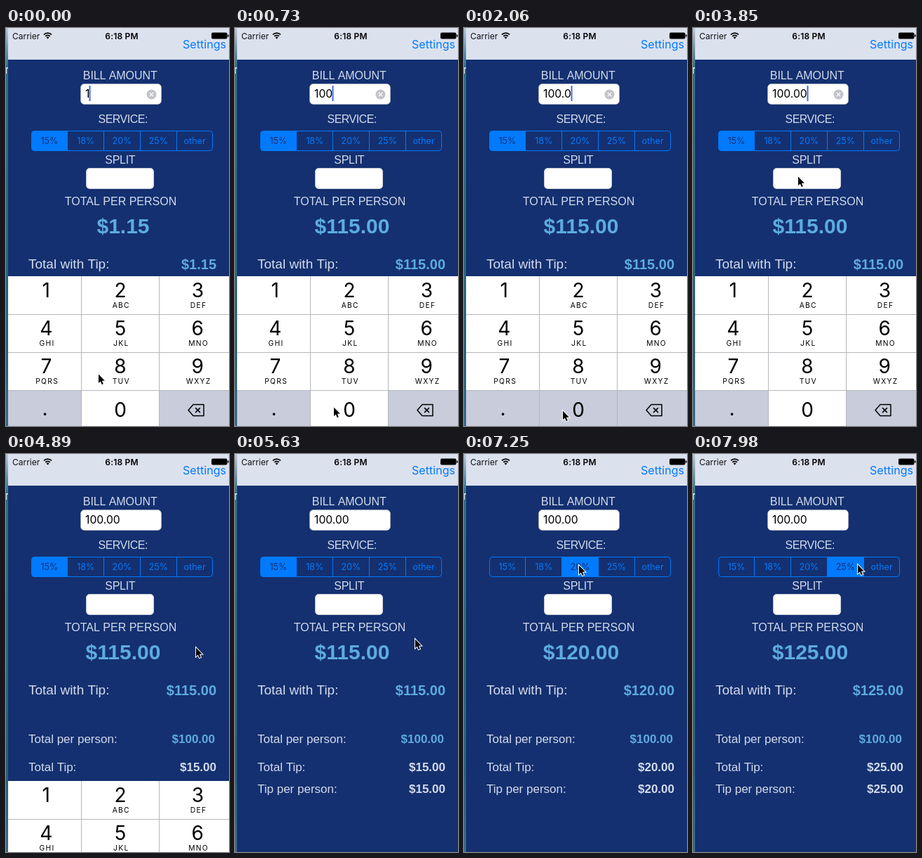
Animation of 318x566 px, one loop 8000 ms. Source, as an HTML page with a canvas:

```html
<!DOCTYPE html>
<html lang="en">
<head>
<meta charset="utf-8">
<title>Tip calculator</title>
<style>
html, body { margin: 0; width: 100%; height: 100%; overflow: hidden; background: #143070; }
canvas { display: block; width: 318px; height: 566px; }
</style>
</head>
<body>
<canvas id="stage"></canvas>
<script>
const W = 318, H = 566, LOOP = 8000, TICK = 148;
const NAVY = '#143070', BLUE = '#007aff', SKY = '#5dabe0', PALE = '#d3dbec', GRAY = '#c8ccdb';
const UI = 'Inter, Roboto, sans-serif';
const LABEL = '"Liberation Sans", Arial, sans-serif';

const canvas = document.getElementById('stage');
const ctx = canvas.getContext('2d');
const ratio = window.devicePixelRatio || 1;
canvas.width = W * ratio;
canvas.height = H * ratio;

// Pointer stops: tick, x, y
const path = [
  [0, 131, 491], [1, 139, 534], [2, 140, 538], [5, 140, 538], [8, 58, 549],
  [10, 58, 549], [12, 138, 544], [13, 140, 543], [18, 140, 543], [23, 148, 211],
  [25, 148, 211], [26, 149, 210], [29, 302, 308], [31, 270, 274], [37, 270, 274],
  [42, 137, 156], [45, 137, 156], [48, 162, 157], [50, 164, 157], [53, 234, 156]
];
const typed = [[0, '1'], [2, '10'], [5, '100'], [9, '100.'], [14, '100.0'], [17, '100.00']];
const service = [[0, 0], [43, 1], [49, 2], [54, 3]];
const slide = [[0, 0], [33, 112], [34, 196], [35, 230]];
const rates = [15, 18, 20, 25];
const zeroDown = [1, 3, 4, 13, 14, 15, 17];
const dotDown = [8, 9];
const letters = ['', 'ABC', 'DEF', 'GHI', 'JKL', 'MNO', 'PQRS', 'TUV', 'WXYZ'];
const colX = [57.3, 163, 273.3];

const at = (list, tick) => list.filter(s => s[0] <= tick).pop()[1];
const money = v => '$' + v.toFixed(2);

function pointer(tick) {
  const i = path.findIndex(p => p[0] > tick);
  if (i < 0) return path[path.length - 1].slice(1);
  const [t0, x0, y0] = path[i - 1], [t1, x1, y1] = path[i];
  const u = (tick - t0) / (t1 - t0), k = u * u * (3 - 2 * u);
  return [Math.round(x0 + (x1 - x0) * k), Math.round(y0 + (y1 - y0) * k)];
}

function rect(x, y, w, h, color) {
  ctx.fillStyle = color;
  ctx.fillRect(x, y, w, h);
}

function text(str, x, y, font, color, align = 'left', spacing = 0) {
  ctx.font = font;
  ctx.letterSpacing = spacing + 'px';
  ctx.fillStyle = color;
  ctx.textAlign = align;
  ctx.fillText(str, x, y);
  ctx.letterSpacing = '0px';
}

function line(points, color, width, close) {
  ctx.beginPath();
  points.forEach(([x, y]) => ctx.lineTo(x, y));
  if (close) ctx.closePath();
  ctx.strokeStyle = color;
  ctx.lineWidth = width;
  ctx.stroke();
}

function cross(x, y, r, color, width) {
  line([[x - r, y - r], [x + r, y + r]], color, width);
  line([[x + r, y - r], [x - r, y + r]], color, width);
}

function box(x, y, w, h, r) {
  ctx.beginPath();
  ctx.roundRect(x, y, w, h, r);
}

function field(x, y, w, h) {
  box(x, y, w, h, 5);
  ctx.fillStyle = '#fff';
  ctx.fill();
  box(x + 0.25, y + 0.25, w - 0.5, h - 0.5, 5);
  ctx.strokeStyle = '#ccc';
  ctx.lineWidth = 0.5;
  ctx.stroke();
}

function edge() {
  const g = ctx.createLinearGradient(0, 0, 0, H);
  g.addColorStop(0, '#b9c9d8');
  g.addColorStop(0.05, '#6f9ab0');
  g.addColorStop(0.1, '#2b6f86');
  g.addColorStop(0.5, '#286a78');
  g.addColorStop(0.8, '#27607a');
  g.addColorStop(1, '#386a8a');
  rect(0, 0, 3, H, g);
  rect(0, 56, 3, 1.5, '#e6eef2');
  rect(0, 56, 1, 9, '#e6eef2');
}

function statusBar() {
  rect(3, 0, W - 3, 45, '#dce1ee');
  text('Carrier', 9, 15.5, '12px ' + UI, '#111');
  text('6:18 PM', 165, 15.5, '600 12px ' + UI, '#000', 'center', 0.2);
  text('Settings', 252, 29, '16px ' + UI, BLUE, 'left', 0.05);

  ctx.strokeStyle = '#000';
  ctx.lineWidth = 1.8;
  for (const r of [4.6, 7.8]) {
    ctx.beginPath();
    ctx.arc(59.5, 15, r, -Math.PI * 0.75, -Math.PI * 0.25);
    ctx.stroke();
  }
  ctx.beginPath();
  ctx.moveTo(59.5, 15.5);
  ctx.arc(59.5, 15.5, 2.8, -Math.PI * 0.75, -Math.PI * 0.25);
  ctx.fillStyle = '#000';
  ctx.fill();

  box(293, 6.5, 22.5, 9, 2);
  ctx.fill();
  rect(316, 9.5, 1.5, 3, '#000');
}

function segments(selected) {
  const left = 36, step = 51.8;
  const cut = i => Math.floor(left + step * i);
  ctx.save();
  box(36.5, 146.5, 258, 28, 4);
  ctx.clip();
  rect(cut(selected), 146, cut(selected + 1) - cut(selected) + 1, 29, BLUE);
  ctx.restore();
  [1, 2, 3, 4].forEach(i => rect(cut(i), 147, 1, 27, BLUE));
  box(36.5, 146.5, 258, 28, 4);
  ctx.strokeStyle = BLUE;
  ctx.lineWidth = 1;
  ctx.stroke();
  [...rates.map(r => r + '%'), 'other'].forEach((name, i) => {
    const mid = left + step * (i + 0.5);
    text(name, mid, 165, '12.5px ' + UI, i === selected ? NAVY : BLUE, 'center');
  });
}

function billField(value, editing, caret) {
  field(106.5, 79.5, 115, 29);
  text(value, 113, 99, '15.7px ' + UI, '#000');
  if (!editing) return;
  if (caret) rect(Math.round(113 + ctx.measureText(value).width) - 0.5, 82, 2, 22, '#4468e4');
  ctx.beginPath();
  ctx.arc(207.5, 94.5, 7, 0, 7);
  ctx.fillStyle = '#c2c4c9';
  ctx.fill();
  cross(207.5, 94.5, 2.6, '#fff', 1.3);
}

function form(tick) {
  const value = at(typed, tick), choice = at(service, tick);
  const bill = parseFloat(value), tip = bill * rates[choice] / 100;
  const total = money(bill + tip);
  const head = '16px ' + LABEL, row = '17px ' + LABEL, bold = 'bold 17px ' + LABEL;

  text('BILL AMOUNT', 162.7, 73, head, PALE, 'center', -0.08);
  billField(value, tick < 33, tick < 30);
  text('SERVICE:', 166.7, 135, head, PALE, 'center', -0.5);
  segments(choice);
  text('SPLIT', 162.8, 193, head, PALE, 'center', -0.3);
  field(114.3, 199.3, 96.5, 29.4);
  text('TOTAL PER PERSON', 163.5, 252, head, PALE, 'center');
  text(total, 167, 292, 'bold 30px ' + LABEL, SKY, 'center');

  text('Total with Tip:', 32, 342, '19px ' + LABEL, PALE);
  text(total, 300, 343, 'bold 20px ' + LABEL, SKY, 'right');
  text('Total per person:', 32, 411, row, PALE);
  text(money(bill), 298, 411, bold, SKY, 'right');
  text('Total Tip:', 32, 451, row, PALE);
  text(money(tip), 300, 451, bold, PALE, 'right');
  text('Tip per person:', 32, 482, row, PALE);
  text(money(tip), 300, 482, bold, PALE, 'right');
}

function keyboard(tick) {
  const big = '28px ' + UI;
  ctx.save();
  ctx.translate(0, at(slide, tick));
  rect(3, 353, W - 3, 220, '#fff');
  rect(3, 515, 105, 58, dotDown.includes(tick) ? '#fff' : GRAY);
  rect(108, 515, 110, 58, zeroDown.includes(tick) ? GRAY : '#fff');
  rect(218, 515, 100, 58, GRAY);
  [407, 461, 515].forEach(y => rect(3, y, W - 3, 1, '#b4b7bd'));
  [107, 218].forEach(x => rect(x, 353, 1, 220, '#b4b7bd'));

  letters.forEach((name, i) => {
    const x = colX[i % 3], y = 383 + 54 * Math.floor(i / 3);
    text(i + 1, x, y, big, '#000', 'center');
    text(name, x + 1.3, y + 15, '10.3px ' + UI, '#000', 'center', 1.3);
  });
  text('.', 55.5, 551, big, '#000', 'center');
  text('0', 163, 553, big, '#000', 'center');

  ctx.lineJoin = 'round';
  line([[260, 543.5], [267, 535.5], [282, 535.5], [282, 551.5], [267, 551.5]], '#000', 1.5, true);
  cross(273.5, 543.5, 3.4, '#000', 1.5);
  ctx.restore();
}

function arrow([x, y]) {
  ctx.save();
  ctx.translate(x, y);
  ctx.lineJoin = 'miter';
  line([[1, 1.5], [1, 14], [3.8, 11.4], [5.8, 16], [7.8, 15.2], [5.9, 10.7], [9.8, 10.5]], '#fff', 2, true);
  ctx.fillStyle = '#000';
  ctx.fill();
  ctx.restore();
}

function draw(now) {
  const tick = Math.floor((now % LOOP + 13) / TICK);
  ctx.setTransform(ratio, 0, 0, ratio, 0, 0);
  rect(0, 0, W, H, NAVY);
  edge();
  statusBar();
  form(tick);
  if (tick < 35) keyboard(tick);
  arrow(pointer(tick));
}

let start = null;
function loop(now) {
  if (start === null) start = now;
  draw(now - start);
  requestAnimationFrame(loop);
}
requestAnimationFrame(loop);
</script>
</body>
</html>
```
